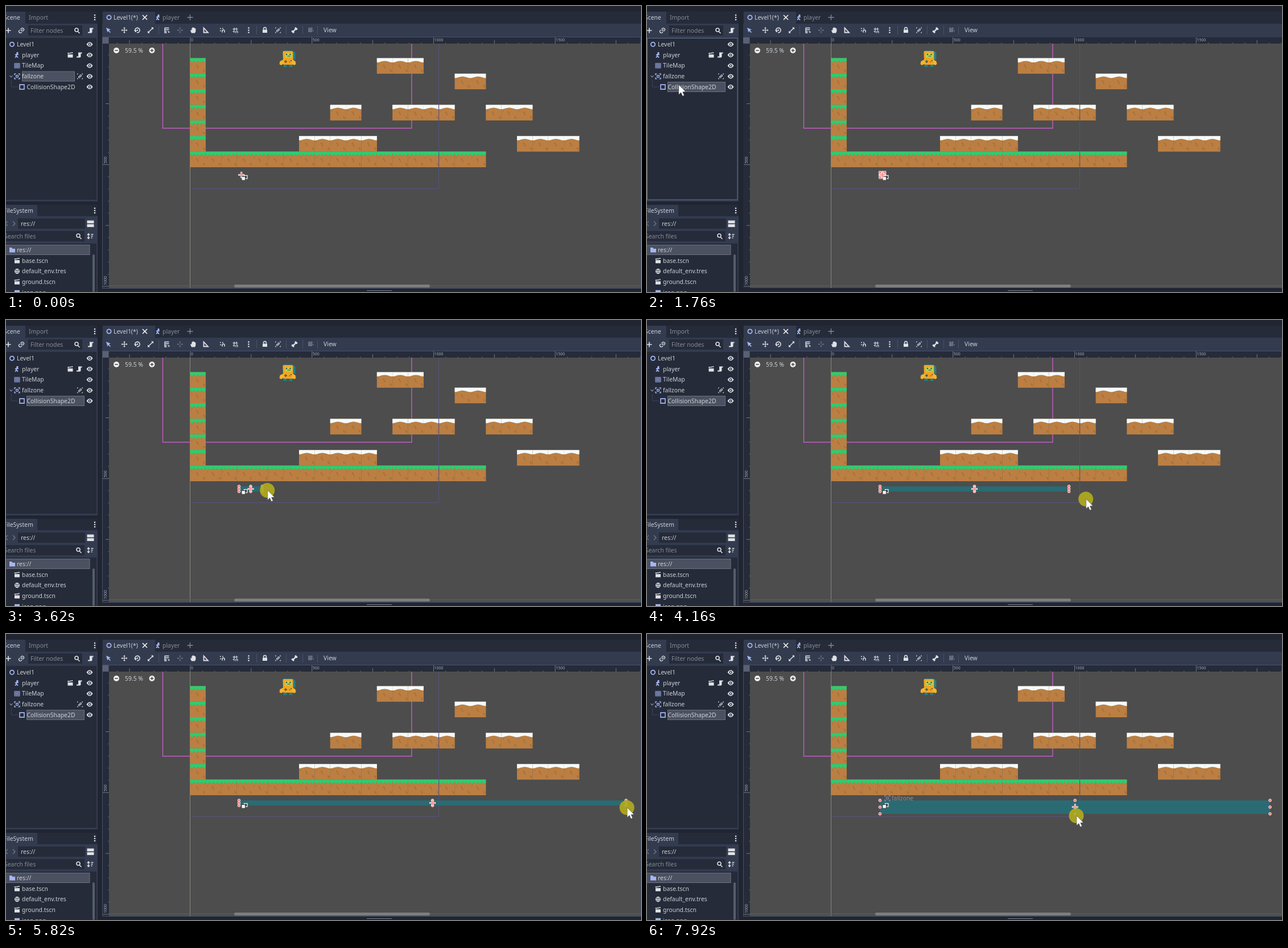
Recreate the animation shown at these times as an HTML page. Size 1116 px wide and 502 px high, loop 7990 ms.

```html
<!DOCTYPE html>
<html lang="en">
<head>
<meta charset="utf-8">
<title>Level editor</title>
<style>
html, body { margin: 0; width: 100%; height: 100%; overflow: hidden; background: #202531; }
svg { display: block; width: 1116px; height: 502px; }
text { font: 10.4px "Noto Sans", "Open Sans", sans-serif; fill: #cdd0d6; white-space: pre; }
.dim { fill: #868b96; }
.ruler { font-size: 7px; fill: #a9adb5; }
</style>
</head>
<body>
<svg id="stage" viewBox="0 0 1116 502" xmlns="http://www.w3.org/2000/svg"></svg>
<script>
const LOOP = 7990;
const BASE = '#333b4f', DARK = '#252b39', DEEP = '#202531', ICON = '#dfe1e5', BLUE = '#a5b7f3';
const TILE = 27.36, ORIGIN_X = 323.5, ORIGIN_Y = 64.1, UNIT = 0.4275;

const rect = (x, y, w, h, fill, more = '') =>
  `<rect x="${x}" y="${y}" width="${w}" height="${h}" fill="${fill}" ${more}/>`;
const label = (x, mid, text, cls = '') => `<text x="${x}" y="${mid + 3.7}" class="${cls}">${text}</text>`;
const line = (d, color, width = 1) => `<path d="${d}" fill="none" stroke="${color}" stroke-width="${width}"/>`;
const shape = (d, color) => `<path d="${d}" fill="${color}"/>`;
const dot = (x, y, r, color) => `<circle cx="${x}" cy="${y}" r="${r}" fill="${color}"/>`;
const at = (x, y, body) => `<g transform="translate(${x} ${y})">${body}</g>`;
const range = n => [...Array(n).keys()];
const each = (list, make) => list.map(make).join('');

// Small icons, all centred on 0,0
const icons = {
  ring: line('M-3.7 0a3.7 3.7 0 1 0 7.4 0a3.7 3.7 0 1 0 -7.4 0', BLUE, 1.7),
  square: line('M-4 -4h8v8h-8z', BLUE, 1.6),
  body: dot(1, -3.5, 1.7, BLUE) + line('M-3 0L0 -1.5L3 -.5M0 -1L-1 2L-3 4.5M-1 1.5L2 4.5', BLUE, 1.8),
  grid: line(each(range(5), i => `M${i * 2.2 - 4.4} -4v8`) + each(range(4), i => `M-5 ${i * 2.7 - 4}h10`), BLUE, .8),
  area: line('M-4.5 -2V-4.5H-2M2 -4.5h2.5V-2M4.5 2v2.5H2M-2 4.5h-2.5V2', BLUE, 1.4) + line('M-1.8 -1.8h3.6v3.6h-3.6z', BLUE, 1.3),
  eye: shape('M-5.5 0Q0 -8 5.5 0Q0 8 -5.5 0z', ICON) + dot(0, 0, 2.5, DARK) + dot(0, 0, 1.2, ICON),
  dots: each([-4, 0, 4], y => dot(0, y, 1.3, ICON)),
  clap: shape('M-4.5 -1h9v5.5h-9zM-5 -3.5l9 -1.5l.4 1.8l-9 1.5z', ICON) + line('M-2 -4.6l1 2M1 -5l1 2', DARK, .8),
  scroll: shape('M-2 -4.5h6.5v2h-2v5q0 2 -2 2h-5.5v-2h3z', ICON),
  group: line('M-4.5 -3v-1.5h1.5M3 -4.5h1.5v1.5M4.5 3v1.5h-1.5M-3 4.5h-1.5v-1.5M-2.5 0h2.5v2.5h-2.5zM0 -2.5h2.5V0H0z', ICON, .9),
  search: line('M2 -1a3 3 0 1 0 -6 0a3 3 0 1 0 6 0M1 1.5l3.5 3.5', ICON, 1.6),
  plus: line('M-4.5 0h9M0 -4.5v9', ICON, 1.6),
  link: line('M-1 1l3 -3M-1.5 -2l2 -2q2 -1 3.5 1t-.5 3l-1.5 1.5M1 2.5l-1.5 1.5q-2 1 -3.5 -1t.5 -3l1 -1', ICON, 1.3),
  globe: line('M-4 0a4 4 0 1 0 8 0a4 4 0 1 0 -8 0M-4 0h8M0 -4q-3.5 4 0 8q3.5 -4 0 -8', ICON, 1.1),
  folder: shape('M-5 -4h4l1.5 2h4.5v6.5h-10z', BLUE),
  rows: rect(-6, -5.5, 12, 5, ICON) + rect(-6, 1, 12, 5, ICON),
  sort: line('M-3 -4v8M-5 2l2 2.5l2 -2.5M-5 -2l2 -2.5l2 2.5M1.5 -3h4M1.5 0h3M1.5 3h2', ICON, 1.3),
  pointer: shape('M-4 -4.5L4 -1L.8 .3L4 3.5L2.8 4.5L-.3 1.4L-1.5 4z', BLUE),
  move: line('M-4 0h8M0 -4v8', ICON, 1.2) + shape('M0 -5.5l2 2.2h-4zM0 5.5l2 -2.2h-4zM-5.5 0l2.2 -2v4zM5.5 0l-2.2 -2v4z', ICON),
  rotate: line('M-3.8 2a4.2 4.2 0 1 1 3 2.2', ICON, 1.6) + shape('M-6 0h5l-2 4z', ICON) + dot(0, 0, 1.2, ICON),
  scale: line('M-4 4L4 -4', ICON, 1.4) + shape('M5 -5v4l-4 -4zM-5 5v-4l4 4z', ICON),
  list: line('M-4.5 -4h8M-4.5 -1h8M-4.5 2h4M-4.5 4.5h4M-4 -4v9', ICON, 1.3) + shape('M1 1l4 2l-2 2z', ICON),
  pivot: line('M-5 0h3.5M1.5 0H5M0 -5v3.5M0 1.5V5', '#737b8c', 1.4),
  hand: shape('M-3 5L-5 .5l1 -1l1.3 1V-3.5h1.3V-5H.2v.5h1.5V-4h1.4v1h1.3V2L3 5z', ICON),
  rule: line('M-3.5 -4V4H4z', ICON, 1.8),
  snap: dot(-4, -3, 1, ICON) + dot(0, -3, 1, ICON) + dot(-4, 1, 1, ICON) + line('M-1 4V1.5q0 -2 2 -2t2 2V4', ICON, 1.5),
  gridSnap: line('M-4.5 -2h9M-2 -4.5v9M2 -4.5v4M-4.5 2h3M1 5V2.5q0 -1.5 1.5 -1.5t1.5 1.5V5', ICON, 1.2),
  lock: rect(-4, -1, 8, 5.5, ICON) + line('M-2.4 -1v-1.5a2.4 2.4 0 0 1 4.8 0V-1', ICON, 1.5),
  bone: line('M-2.5 2.5l5 -5', ICON, 2.4) + each([-1, 1], s => dot(3.6 * s, -2 * s, 1.7, ICON) + dot(2 * s, -3.6 * s, 1.7, ICON)),
  camera: rect(-4, -2, 7, 5.5, '#666e80') + dot(-2, -3, 2, '#666e80') + dot(2, -3, 2, '#666e80') + shape('M3 1l2.5 -2v4z', '#666e80'),
  fold: line('M-2.5 -1.2L0 1.5l2.5 -2.7', '#8c919c', 1.2),
};
const icon = (name, x, y) => at(x, y, icons[name]);

function panels() {
  const files = ['base.tscn', 'default_env.tres', 'ground.tscn', 'icon.png'];
  return rect(0, 0, 1116, 502, DEEP)
    + rect(0, 10, 160, 21, DARK) + rect(0, 10, 34, 21, BASE) + rect(0, 31, 161, 312, BASE) + rect(0, 56, 159, 284, DARK)
    + label(-4, 20, 'Scene') + label(40, 20, 'Import', 'dim') + icon('dots', 156, 20)
    + icon('plus', 4, 43) + icon('link', 27, 43) + rect(39, 34, 95, 18, DARK)
    + label(43, 43, 'Filter nodes', 'dim') + icon('search', 125, 43) + icon('scroll', 149, 43)
    + rect(0, 349, 160, 20, DARK) + rect(0, 349, 55, 20, BASE) + rect(0, 369, 161, 133, BASE)
    + label(-4, 359, 'FileSystem') + icon('dots', 156, 359)
    + rect(21, 373, 118, 18, DARK) + label(26, 382, 'res://')
    + line('M3 378l-4 4l4 4M12 378l4 4l-4 4', '#737b8c', 1.2) + icon('rows', 148.5, 382)
    + rect(0, 395, 138, 18, DARK) + label(-3, 404, 'Search files', 'dim') + icon('search', 128, 404) + icon('sort', 148, 404)
    + rect(0, 417, 159, 85, DARK) + rect(-1, 419.5, 148, 17, '#4b5160', 'stroke="#6a707c"')
    + rect(152, 436, 4, 66, '#555c6b', 'rx="2"')
    + icon('folder', 11, 428) + label(19, 428, 'res://')
    + each(files, (name, i) => {
      const y = 447 + i * 18.6;
      const mark = name.endsWith('tscn') ? icon('clap', 19.5, y) : name.endsWith('tres') ? icon('globe', 19.5, y) : rect(15, y - 4, 9, 8, BLUE);
      return mark + label(28, y, name);
    });
}

function sceneTree() {
  const row = i => 67.3 + i * 18.7;
  return line('M9.5 130V142H21', '#3a4253')
    + '<rect id="picked" height="17" fill="#4b5160" stroke="#6a707c"/>'
    + icon('ring', 10.5, row(0)) + label(19, row(0), 'Level1')
    + icon('body', 19, row(1)) + label(28, row(1), 'player') + icon('clap', 113, row(1)) + icon('scroll', 129, row(1))
    + icon('grid', 19.5, row(2)) + label(28, row(2), 'TileMap')
    + icon('fold', 9, row(3)) + icon('area', 19.5, row(3)) + label(28, row(3), 'fallzone') + icon('group', 130, row(3))
    + icon('square', 28, row(4)) + label(36.5, row(4), 'CollisionShape2D')
    + each(range(5), i => icon('eye', 147, row(i)))
    + '<rect id="treeFocus" x=".5" y="56.5" width="158.5" height="283.5" fill="none" stroke="#64718a"/>';
}

function toolbar() {
  const tools = { pointer: 180, move: 208, rotate: 231, scale: 254, list: 283, pivot: 306, hand: 329, rule: 351,
    snap: 381, gridSnap: 403, dots: 426.5, lock: 455, group: 478, bone: 507, camera: 535 };
  return rect(169, 10, 947, 21, DARK) + rect(170, 10, 92, 21, BASE) + rect(169, 31, 947, 24, BASE)
    + icon('ring', 181, 20) + label(189, 20, 'Level1(*)') + line('M240 16l8 8M248 16l-8 8', '#f0f1f3', 1.7)
    + icon('body', 267, 20) + label(275, 20, 'player', 'dim') + line('M318.5 20h10M323.5 15v10', '#868b96', 1.3)
    + each(Object.entries(tools), ([name, x]) => icon(name, x, 42.5))
    + each([268, 440, 492, 521, 547], x => rect(x, 35, 1, 15, '#4a5265'))
    + label(558, 42.5, 'View');
}

const spots = each(range(6), i => dot(3 + i * 11 % 23, 11 + i * 6 % 14, 1 + i % 3 * .2, '#a96f38'));
const snowLine = each(range(13), i => `L${TILE * (1 - i / 12)} ${6.3 + 1.3 * Math.cos(i / 6 * Math.PI)}`);
const grassLine = each(range(9), i => `L${TILE * (1 - i / 8)} ${i % 2 ? 8 : 4.5}`);
function tile(col, row, snowy) {
  const edge = snowy ? snowLine : grassLine;
  return at(ORIGIN_X + col * TILE, ORIGIN_Y + row * TILE,
    rect(0, 0, TILE + .1, TILE, '#bb7f43') + spots + line('M' + edge.slice(1), '#a97039', .8)
    + shape(`M0 0H${TILE + .1}${edge}z`, snowy ? '#f4fbfd' : '#2ecc71'));
}

function player() {
  return at(494.5, 93,
    shape('M-8 -13q1 -2 3 -1.5H8q5 1 6 4V1H-8z', '#1f7f8f')
    + shape('M-8 -12q0 -2 2 -2H7q3 0 3 2V10h-17z', '#f3a51d')
    + rect(-4.5, -11, 13, 8.5, '#b9cf51', 'rx="1"')
    + dot(-1.5, -8, 1.2, '#27545b') + dot(5, -8, 1.2, '#27545b') + line('M0 -5h5', '#27545b')
    + shape('M-7 1l-6 3l-1 5l3 2l5 -3zM9 1l5 3l1 5l-3 2l-4 -3z', '#f6b52a')
    + line('M-3 2v5M-5.5 4.5h5', '#31545b', 1.3) + dot(4, 5, 1.1, '#cc4b37') + dot(6.5, 3, 1.1, '#31545b')
    + rect(-7, 10, 6, 4, '#1f7f8f') + rect(3, 10, 6, 4, '#1f7f8f'));
}

function rulers() {
  let out = rect(169, 55, 947, 11, DARK) + rect(169, 55, 12, 440, DARK) + rect(169, 55, 11.5, 11, '#596174');
  for (let u = -350; u <= 1850; u += 50) {
    const x = ORIGIN_X + u * UNIT, y = ORIGIN_Y + u * UNIT;
    const len = u % 500 === 0 ? 11 : u % 250 === 0 ? 6 : 1.5;
    if (x > 182) out += rect(x, 66 - len, .9, len, '#7b818c');
    if (u > 0 && y < 494) out += rect(181 - len, y, len, .9, '#7b818c');
    if (len === 11 && u >= 0) out += `<text class="ruler" x="${x + 1.5}" y="61.7">${u}</text>`;
    if (len === 11 && u > 0) out += `<text class="ruler" transform="translate(176.5 ${y - 1.5}) rotate(-90)">${u}</text>`;
  }
  return out;
}

function level() {
  // column, row, tile count
  const snow = [[12, 1, 3], [17, 2, 2], [9, 4, 2], [13, 4, 4], [19, 4, 3], [7, 6, 5], [21, 6, 4]];
  return rect(181, 66, 935, 429, '#4d4d4d')
    + rect(323, 66, 1, 429, '#87897f')
    + line('M275.5 66V214.5H713V66', '#c45cc4', 1.4)
    + player()
    + each(range(6), i => tile(0, 1 + i)) + each(range(19), i => tile(i, 7))
    + each(snow, ([col, row, n]) => each(range(n), i => tile(col + i, row, true)))
    + line('M760.5 66V320.5H323.5', '#57527f')
    + rect(181, 490.5, 935, 1.5, '#5c5c5c') + rect(401, 489, 344, 5, '#7e7e7e', 'rx="2.5"')
    + dot(194, 78, 5, '#f2f2f2') + line('M191.2 78h5.6', '#444', 1.5)
    + label(209, 78, '59.5 %') + dot(256.5, 78, 5, '#f2f2f2') + line('M253.7 78h5.6M256.5 75.2v5.6', '#444', 1.5);
}

function gizmos() {
  return '<rect id="zone" fill="#2a6b73"/>'
    + `<g id="hint" opacity=".5">${icon('area', 422.5, 288)}${label(430, 288, 'fallzone')}</g>`
    + '<g id="handles"></g>'
    + rect(418.5, 297.5, 5.5, 5.5, '#444', 'stroke="#f5f5f5" stroke-width="1.2"') + rect(414, 299.5, 6.5, 6.5, '#f5f5f5', 'stroke="#444"')
    + `<g id="cross">${line('M-5.5 0h11M0 -5.5v11', '#eee', 3)}${line('M-4.5 0h9M0 -4.5v9', '#f58282', 1.5)}</g>`;
}

const stage = document.getElementById('stage');
stage.innerHTML = panels() + sceneTree() + toolbar() + level() + rulers() + gizmos()
  + '<rect id="viewFocus" x="169.5" y="54.5" width="946" height="441" fill="none" stroke="#46526a"/>'
  + rect(169, 496, 947, 6, DEEP) + rect(634, 499, 44, 1, '#7c828d')
  + '<g id="cursor"><circle id="press" cx="-.5" r="13" fill="#b0aa1c" opacity=".92"/>'
  + '<path d="M0 0V17L3.9 13.4L6.6 19.6L9.5 18.3L6.8 12.3L12 12z" fill="#fff" stroke="#444" stroke-width=".5"/></g>';
const part = Object.fromEntries([...stage.querySelectorAll('[id]')].map(e => [e.id, e]));

const easeIn = power => p => p ** power;
const easeOut = power => p => 1 - (1 - p) ** power;
const easeBoth = p => p < .5 ? 4 * p ** 3 : 1 - 4 * (1 - p) ** 3;
const linear = p => p;

// Pointer moves; each refreshes the picture a fixed number of times
const START = { x: 1233, y: 563 };
const PRESS = 3210, RELEASE = 6090, PRESS_AGAIN = 7300;
const moves = [
  { from: 200, to: 680, steps: 8, x: 57, y: 128, ease: easeOut(2) },
  { from: 950, to: 950, steps: 1, x: 58, y: 140, ease: linear },
  { from: 1150, to: 1150, steps: 1, x: 59, y: 134, ease: linear },
  { from: 1310, to: 1360, steps: 2, x: 65, y: 144, ease: linear },
  { from: 1560, to: 1560, steps: 1, x: 55, y: 138, ease: linear },
  { from: 1760, to: 2530, steps: 12, x: 421, y: 309, ease: easeBoth },
  { from: 2600, to: 2880, steps: 5, x: 418, y: 295, ease: easeOut(2) },
  { from: PRESS, to: 3960, steps: 11, x: 608, y: 313, ease: easeIn(2.5) },
  { from: 4020, to: 4770, steps: 12, x: 1003, y: 316, ease: easeOut(1.86) },
  { from: 4840, to: 5610, steps: 12, x: 1082, y: 310, ease: linear },
  { from: 5680, to: 5890, steps: 4, x: 1095, y: 303, ease: linear },
  { from: RELEASE, to: 6830, steps: 11, x: 760, y: 296, ease: easeOut(1.5) },
  { from: 6900, to: 7030, steps: 2, x: 752, y: 296, ease: linear },
  { from: PRESS_AGAIN, to: 7920, steps: 9, x: 755, y: 319, ease: linear },
];

// Pointer place at a time, with the time of the refresh that put it there
function pointerAt(t) {
  const i = moves.findLastIndex(m => m.from <= t);
  if (i < 0) return { ...START, time: 0 };
  const move = moves[i], start = moves[i - 1] || START;
  const gap = (move.to - move.from) / (move.steps - 1 || 1);
  const step = gap ? Math.min(move.steps - 1, Math.floor((t - move.from) / gap + 1e-6)) : 0;
  const p = move.ease((step + 1) / move.steps);
  return { x: start.x + (move.x - start.x) * p, y: start.y + (move.y - start.y) * p, time: move.from + step * gap };
}

// The dragged edge trails the pointer by part of a refresh
function rightEdge(time) {
  const t = Math.min(Math.max(time, PRESS - 1), RELEASE - 1);
  return .4 * pointerAt(t).x + .6 * pointerAt(t - 60).x;
}

const within = (t, a, b) => t >= a && t < b;
const show = (el, on) => el.setAttribute('visibility', on ? 'inherit' : 'hidden');
const set = (el, attrs) => Object.entries(attrs).forEach(([k, v]) => el.setAttribute(k, v));

function draw(now) {
  const { x, y, time } = pointerAt(now);
  const picked = time >= 1310, treeFocused = within(time, 1310, 2030);
  set(part.picked, picked ? { x: 36.5, y: 133.5, width: 101 } : { x: 28.5, y: 115, width: 92 });
  show(part.treeFocus, treeFocused);
  show(part.viewFocus, !treeFocused);

  const left = 409.5, top = 292, right = rightEdge(time);
  const bottom = 301 + (time >= PRESS_AGAIN ? (y - 296) * .64 : 0);
  const midX = (left + right) / 2, midY = (top + bottom) / 2;
  set(part.zone, { x: left, y: top, width: right - left, height: bottom - top, opacity: picked ? 1 : .35 });
  set(part.cross, { transform: `translate(${midX} ${midY})` });
  part.handles.innerHTML = !picked ? '' : each([left, midX, right], hx => each([top, midY, bottom], hy =>
    `<circle cx="${hx}" cy="${hy}" r="2.4" fill="#f47f7f" stroke="#fbe3e3" stroke-width=".9"/>`));
  show(part.hint, within(time, 2735, PRESS) || time >= 6620);

  set(part.cursor, { transform: `translate(${x} ${y})` });
  show(part.press, within(time, 1310, 1360) || within(time, PRESS, RELEASE) || time >= PRESS_AGAIN);
}

function tick() {
  draw(performance.now() % LOOP);
  requestAnimationFrame(tick);
}
tick();
</script>
</body>
</html>
```
